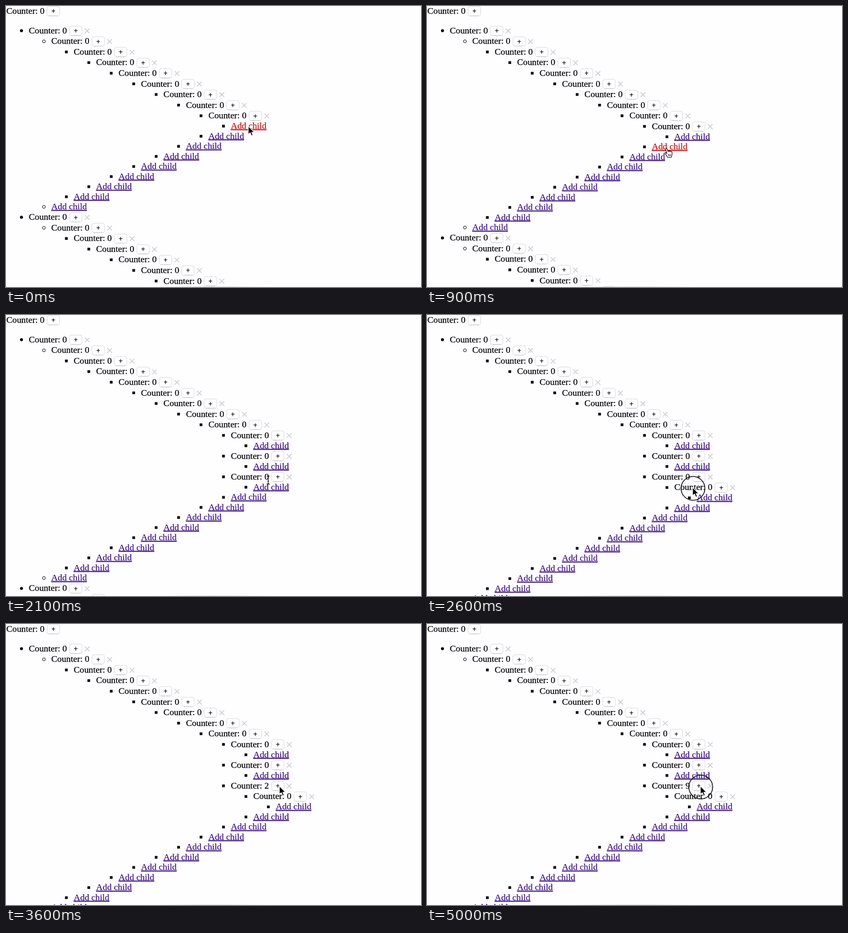
Animation, 800 px wide and 543 px high, one loop 5.1 s. Source, as an HTML page:

```html
<!DOCTYPE html>
<html lang="en">
<head>
<meta charset="utf-8">
<title>Counter tree</title>
<style>
  html, body { margin: 0; width: 100%; height: 100%; overflow: hidden; background: #fefdff; }
  svg { display: block; }
  text { font: 17.3px "Liberation Serif", Times, serif; white-space: pre; stroke: #000; stroke-width: .25; }
  .plus { font: 13px "Liberation Sans", Arial, sans-serif; text-anchor: middle; }
  .link { fill: #3c1282; stroke: #3c1282; text-decoration: underline; text-decoration-thickness: 1px; }
  .link.active { fill: #cf0808; stroke: #cf0808; }
  .btn { fill: #fff; stroke: #d9d8da; }
  .edge { stroke: #c6c5c8; fill: none; }
  .close { stroke: #cfced1; stroke-width: 1.6; fill: none; }
  .ring { fill: none; stroke: #151515; stroke-width: 1.6; }
</style>
</head>
<body>
<svg width="800" height="543" viewBox="0 0 800 543">
  <defs>
    <radialGradient id="shade">
      <stop offset="0" stop-color="#bbb" stop-opacity=".55"/>
      <stop offset="1" stop-color="#bbb" stop-opacity="0"/>
    </radialGradient>
  </defs>
  <g id="tree"></g>
  <ellipse cx="397" cy="544" rx="135" ry="3.5" fill="url(#shade)"/>
  <g id="pointer"></g>
</svg>
<script>
const LOOP = 5100, TICK = 100;
const LEFT = 44, INDENT = 43.27, TOP = 36.8;
const COUNTER_H = 20.55, LINK_H = 19.5;

// Rows are depths: n >= 0 is a counter, negative is an "Add child" link.
const chain = [0, 1, 2, 3, 4, 5, 6, 7, 8];
const leaf = [9, -10];
const branches = [
  [],
  leaf,
  [...leaf, ...leaf],
  [...leaf, ...leaf, ...leaf],
  [...leaf, ...leaf, 9, 10, -11, -10],
];
const links = [-9, -8, -7, -6, -5, -4, -3, -2, -1];
const stages = branches.map(b => [...chain, ...b, ...links, ...chain]);

const addTimes = [100, 1000, 1900, 2600]; // each one opens the next stage
const activeRows = [9, 11, 13, 14];       // link pressed just before that
const COUNTING_ROW = 13;
const FIRST_CLICK = 3240, CLICK_GAP = 215, RING_TIME = 90;

// time, x, y, cursor shape
const path = [
  [0, 467, 232, 'arrow'], [100, 467, 232, 'arrow'], [200, 467, 234, 'beam'],
  [400, 462, 262, 'arrow'], [500, 458, 274, 'hand'], [600, 457, 280, 'hand'],
  [800, 460, 275, 'hand'], [1000, 460, 275, 'arrow'], [1100, 460, 276, 'beam'],
  [1300, 464, 306, 'hand'], [1500, 465, 323.5, 'arrow'], [1600, 465, 323.5, 'arrow'],
  [1700, 466, 315, 'hand'],
  [1900, 466, 314, 'arrow'], [2000, 480, 315, 'beam'], [2100, 505.5, 319, 'beam'],
  [2300, 512, 333, 'hand'], [2600, 512, 333, 'arrow'], [2700, 514, 332, 'beam'],
  [2800, 528, 325, 'arrow'], [2900, 537, 320, 'arrow'], [3100, 527, 313, 'arrow'],
  [LOOP, 527, 313, 'arrow'],
];

const cursors = {
  arrow: '<path d="M0 0V16.3L3.7 13L6.3 18.8L9 17.6L6.6 12H11.8Z" fill="#000" stroke="#fff" stroke-width="1.2"/>',
  beam: '<path d="M-3-8Q0-8 0-6Q0-8 3-8M0-6V6M-3 8Q0 8 0 6Q0 8 3 8M-1.5 2H1.5" fill="none" stroke="#000" stroke-width="1.1"/>',
  hand: '<path d="M0 1.2C0-.4 2.2-.6 2.8 1L4.6 6C5 4.8 7 4.8 7.4 6C8.2 5 9.8 5.4 10 6.6C11.2 6 12.4 6.8 12.4 8.2V11.5C12.4 14 11 15 10.8 17.5H3.6C3 14.5-.2 12-1.4 9.8C-2 8.2 0 7.6 1 8.8L2.3 10Z" fill="#fff" stroke="#000" stroke-width="1.1"/>'
    + '<path d="M5.4 11.5V15M7.5 11.5V15M9.5 11.5V15" stroke="#000" stroke-width=".9"/>',
};

function bullet(depth, x, y) {
  if (depth === 0) return `<circle cx="${x}" cy="${y}" r="2.9"/>`;
  if (depth === 1) return `<circle cx="${x}" cy="${y}" r="2.8" fill="none" stroke="#000"/>`;
  return `<rect x="${x - 2.6}" y="${y - 2.6}" width="5.2" height="5.2"/>`;
}

function counter(x, base, value) {
  const left = x + 78.5, top = base - 13.9;
  return `<text x="${x}" y="${base}">Counter: ${value}</text>
    <rect class="btn" x="${left}" y="${top}" width="24" height="18" rx="3.5"/>
    <path class="edge" d="M${left + 3} ${top + 18}h18"/>
    <text class="plus" x="${left + 12}" y="${base - 0.6}">+</text>`;
}

function closeMark(x, base) {
  return `<path class="close" d="M${x + 108} ${base - 9.2}l9 9m0-9l-9 9"/>`;
}

function drawTree(stage, active, value) {
  let top = TOP;
  let out = counter(0.8, 15, 0);
  stages[stage].forEach((row, i) => {
    const depth = Math.abs(row), isLink = row < 0;
    const x = LEFT + INDENT * depth;
    const base = top + (isLink ? 15.5 : 16);
    out += bullet(depth, x - 14.2, base - 5.1);
    if (isLink) {
      out += `<text class="link${i === active ? ' active' : ''}" x="${x}" y="${base}">Add child</text>`;
    } else {
      const counting = stage === 4 && i === COUNTING_ROW;
      out += counter(x, base, counting ? value : 0) + closeMark(x, base);
    }
    top += isLink ? LINK_H : COUNTER_H;
  });
  return out;
}

function pointerAt(t) {
  const i = path.findLastIndex(p => p[0] <= t);
  const a = path[i], b = path[i + 1] || a;
  const k = b === a ? 0 : (t - a[0]) / (b[0] - a[0]);
  return { x: a[1] + (b[1] - a[1]) * k, y: a[2] + (b[2] - a[2]) * k, shape: a[3] };
}

const tree = document.getElementById('tree');
const pointer = document.getElementById('pointer');
let lastTree = '', lastTick = -1;

function render(t) {
  if (t === lastTick) return;
  lastTick = t;

  const stage = addTimes.filter(a => a <= t).length;
  const pressed = stage < 4 && addTimes[stage] - t <= TICK;
  const clicks = Math.max(0, Math.floor((t - FIRST_CLICK) / CLICK_GAP) + 1);
  const active = pressed ? activeRows[stage] : -1;
  const key = [stage, active, clicks].join();
  if (key !== lastTree) {
    tree.innerHTML = drawTree(stage, active, clicks);
    lastTree = key;
  }

  const lastClick = clicks ? FIRST_CLICK + (clicks - 1) * CLICK_GAP : addTimes[stage - 1];
  const ring = t - lastClick < RING_TIME ? '<circle class="ring" cx=".7" cy="2" r="23"/>' : '';
  const { x, y, shape } = pointerAt(t);
  pointer.setAttribute('transform', `translate(${x} ${y})`);
  pointer.innerHTML = ring + cursors[shape];
}

const start = performance.now();
function loop() {
  const t = (performance.now() - start) % LOOP;
  render(Math.floor(t / TICK) * TICK);
  requestAnimationFrame(loop);
}
loop();
</script>
</body>
</html>
```
